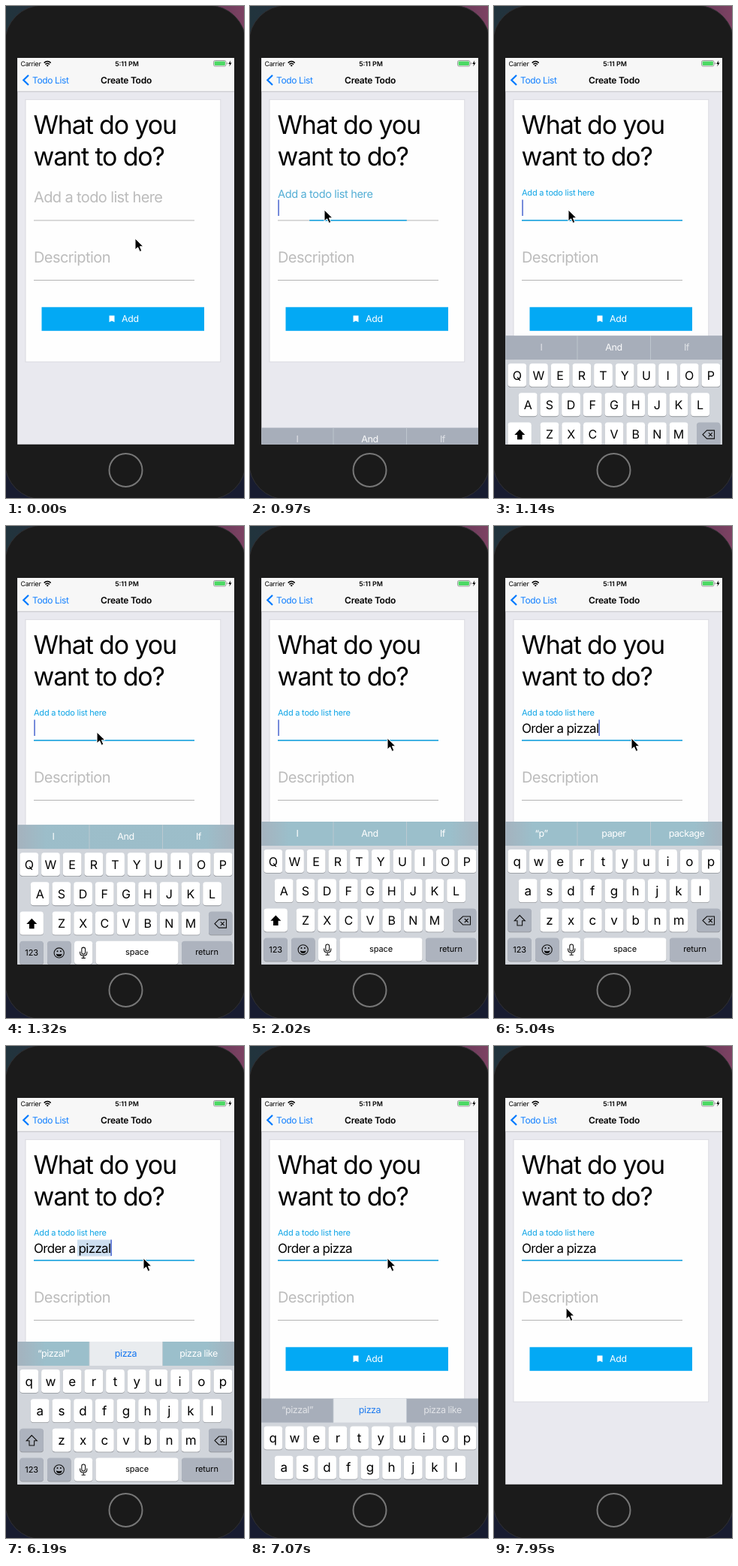
An HTML page that plays this animation: 317 px wide and 654 px high, repeating every 8 s.

```html
<!DOCTYPE html>
<html lang="en">
<head>
<meta charset="utf-8">
<title>Create Todo</title>
<style>
  html, body { margin: 0; width: 100%; height: 100%; overflow: hidden; background: #1b1b1b; }
  svg { display: block; width: 100%; height: 100%; }
  text { font-family: Inter, "Open Sans", sans-serif; font-optical-sizing: none; white-space: pre; text-rendering: geometricPrecision; }
  .mid { text-anchor: middle; }
  .title { font-size: 34px; letter-spacing: -.034em; }
  .nav { font-size: 12px; letter-spacing: -.03em; }
  .status { font-size: 8.8px; letter-spacing: -.03em; }
  .hint { font-size: 20px; letter-spacing: -.028em; fill: #bcbcbc; }
  .entry { font-size: 17px; letter-spacing: -.04em; }
  .small { font-size: 11px; letter-spacing: -.01em; }
  .guess { font-size: 12.5px; letter-spacing: -.035em; fill: #fff; }
</style>
</head>
<body>
<svg viewBox="0 0 317 654" preserveAspectRatio="none">
  <defs>
    <linearGradient id="desk">
      <stop offset="0" stop-color="#21343d"/><stop offset=".6" stop-color="#332a40"/><stop offset="1" stop-color="#7d4263"/>
    </linearGradient>
    <linearGradient id="tint">
      <stop offset="0" stop-color="#9dbfca" stop-opacity=".25"/><stop offset=".13" stop-color="#9bbfcb"/>
      <stop offset=".87" stop-color="#9bbfcb"/><stop offset="1" stop-color="#9dbfca" stop-opacity=".25"/>
    </linearGradient>
    <clipPath id="screen"><rect x="15.2" y="69" width="288.8" height="513.8"/></clipPath>
  </defs>

  <rect width="317" height="327" fill="url(#desk)"/>
  <rect y="327" width="317" height="327" fill="#181c30"/>
  <rect x="-1.5" y="-1" width="321" height="657" rx="50" fill="#1b1b1b" stroke="#303033"/>
  <circle cx="159.5" cy="617" r="22" fill="#1a1a1a" stroke="#777" stroke-width="2"/>

  <g clip-path="url(#screen)">
    <rect x="15" y="69" width="290" height="515" fill="#e9e9ef"/>
    <rect x="15" y="69" width="290" height="44.5" fill="#f7f7f7"/>
    <path d="M15 113.8H305" stroke="#b9b9be" stroke-width=".8"/>

    <text class="status" x="19.5" y="80">Carrier</text>
    <g fill="none" stroke="#000" stroke-width="1.5">
      <path d="M50.7 75.6Q55.2 71.3 59.7 75.6M52.4 77.6Q55.2 75 58 77.6"/>
    </g>
    <path d="M53.6 78.9Q55.2 77.6 56.8 78.9L55.2 80.6Z"/>
    <text class="status mid" x="161" y="80" font-weight="600" style="letter-spacing:0">5:11 PM</text>
    <rect x="276.5" y="72.5" width="16.5" height="7.6" rx="2" fill="none" stroke="#888" stroke-width=".8"/>
    <rect x="277.6" y="73.6" width="14.3" height="5.4" rx="1" fill="#4cd964"/>
    <path d="M294 75v2.6q1.2-.3 1.2-1.3t-1.2-1.3" fill="#888"/>
    <path d="M299.2 72.2L296.2 77H298.2L297.2 80.6L300.6 75.6H298.5Z"/>

    <path d="M30 92L23.3 98.5L30 105" fill="none" stroke="#007aff" stroke-width="2.2"/>
    <text class="nav" x="35" y="103" fill="#1480ff">Todo List</text>
    <text class="nav mid" x="160" y="103" font-weight="600" style="letter-spacing:-.022em">Create Todo</text>

    <rect x="26" y="124.3" width="259.8" height="348.7" fill="#fefefe" stroke="#d8d8de" stroke-width=".9"/>
    <text class="title" x="36.5" y="169.8">What do you</text>
    <text class="title" x="36.5" y="211.8">want to do?</text>

    <rect id="mark" y="257.5" height="22" fill="#cddff0"/>
    <text id="label" x="37"></text>
    <text id="entry" class="entry" x="37" y="274.6"></text>
    <rect id="caret" y="257.5" width="1.5" height="21.5" fill="#4a66cf"/>
    <path d="M37 285H251" stroke="#b4b4b4"/>
    <path id="line" stroke="#0fa5e6" stroke-width="1.5"/>

    <text class="hint" x="37" y="341">Description</text>
    <path d="M37 364.5H251" stroke="#b4b4b4"/>

    <rect x="47.5" y="400.3" width="216.5" height="31.5" fill="#03a9f4"/>
    <path d="M137.5 411.5h7v8.8l-3.5-1.7l-3.5 1.7Z" fill="#fff"/>
    <text x="154" y="420.3" font-size="12.3" letter-spacing="-.3" fill="#fff">Add</text>

    <g id="board"></g>
  </g>

  <path id="mouse" d="M0 0V15L3.6 11.8L6.2 17.5L8.8 16.4L6.4 10.8H11Z" fill="#000" stroke="#fff" stroke-width="1" stroke-linejoin="round"/>
</svg>

<script>
const LOOP = 8000, TICK = 88.3;
const FOCUS = 950, FIX = 6970;
const BLUE = [15, 165, 230], GREY = [188, 188, 188];
const $ = id => document.getElementById(id);
const clamp = v => Math.max(0, Math.min(1, v));
const ramp = (t, a, b) => clamp((t - a) / (b - a));
const mix = (a, b, p) => a + (b - a) * p;
const easeOut = p => 1 - (1 - p) ** 3;
const latest = (list, t) => list.filter(e => e[0] <= t).pop();

const typed = [
  [0, ''], [2190, 'O'], [2370, 'Or'], [2720, 'Ord'], [2980, 'Orde'], [3330, 'Order'],
  [3510, 'Order '], [3770, 'Order a'], [4040, 'Order a '], [4220, 'Order a p'], [4390, 'Order a pi'],
  [4570, 'Order a piz'], [4750, 'Order a pizz'], [4920, 'Order a pizza'], [5010, 'Order a pizzal'],
  [FIX, 'Order a pizza']
];
// Braces mark letters that are still fading in.
const guesses = [
  [0, 'I', 'And', 'If'], [2540, '“O”', 'Or', 'Of'], [2980, '“Or”', 'Order', 'Original'],
  [3330, '“Or{d}”', 'Ordered', 'Or{ig}ina'], [3420, '“Order”', 'Ordered', 'Orders'],
  [3680, 'the', 'of', 'for'], [4040, '“a”', 'and', 'at'], [4300, '“p”', 'paper', 'package'],
  [5360, '“pizzal”', 'pizza', 'pizza like']
];
const mousePath = [
  [0, 172, 309], [88, 204, 250], [177, 150, 147], [265, 60, 210], [353, 110, 335], [442, 150, 398],
  [530, 104, 276], [700, 99, 271], [1230, 99, 271], [1590, 183, 282], [7240, 183, 282],
  [7500, 150, 315], [7770, 101, 352], [7860, 98, 350], [7950, 96, 348]
];

function key(x, y, w, inner, dark) {
  const box = (dy, fill) => `<rect x="${x}" y="${y + dy}" width="${w}" height="31" rx="3.8" fill="${fill}"/>`;
  return box(.8, '#8f9298') + box(0, dark ? '#adb3be' : '#fff') + inner;
}
const word = (x, y, s) => `<text class="small mid" x="${x}" y="${y}">${s}</text>`;
const arrow = 'M34.3 517.5L27.3 524.8H31V531H37.6V524.8H41.3Z';

function buildBoard() {
  let out = '<rect x="15" y="393" width="290" height="32.5" fill="#a7aeba"/>' +
    '<rect id="glow" x="15" y="393" width="290" height="32.5" fill="url(#tint)"/>' +
    '<rect id="pick" x="111" y="393" width="97.5" height="32.5" fill="#e9ecef"/>' +
    '<path d="M111 393V425M208.5 393V425" stroke="#c3ccd4" stroke-width=".8"/>' +
    '<rect x="15" y="425" width="290" height="160" fill="#d1d5db"/><g id="words">';
  [63, 159.5, 256.5].forEach(x => out += `<text class="guess mid" x="${x}" y="412.5"></text>`);
  out += '</g>';
  [['QWERTYUIOP', 18.4, 430], ['ASDFGHJKL', 32.8, 469.2], ['ZXCVBNM', 61.6, 508.4]].forEach(([row, x0, y]) => {
    [...row].forEach((c, i) => {
      const x = x0 + i * 28.68;
      out += key(x, y, 24.8, `<text class="letter mid" x="${x + 12.4}" y="${y + 21.5}" data-c="${c}"></text>`);
    });
  });
  const line = 'fill="none" stroke="#111" stroke-width="1.1"';
  out += `<g id="shiftOn">${key(18.4, 508.4, 31.5, `<path d="${arrow}"/>`)}</g>`;
  out += `<g id="shiftOff">${key(18.4, 508.4, 31.5, `<path d="${arrow}" ${line}/>`, true)}</g>`;
  out += key(270, 508.4, 31.3, `<path d="M278 524.5L283.5 519H293.5V530H283.5ZM285.8 522L290.8 527M290.8 522L285.8 527" ${line}/>`, true);
  out += key(18.4, 547.5, 31.5, word(34.2, 567, '123'), true);
  out += key(55, 547.5, 31.5, `<circle cx="70.7" cy="563.3" r="6.6" ${line}/>` +
    '<path d="M66.8 564.5Q70.7 565.8 74.6 564.5Q74 568 70.7 568T66.8 564.5Z"/>' +
    '<circle cx="68.5" cy="561" r="1"/><circle cx="72.9" cy="561" r="1"/>', true);
  out += key(91, 547.5, 24.3, `<rect x="100.8" y="556" width="4.8" height="9" rx="2.4" ${line}/>` +
    `<path d="M98.6 561.5V563Q98.6 567 103.2 567T107.8 563V561.5M103.2 567V570M100.6 570.2H105.8" ${line}/>`);
  out += key(119.5, 547.5, 110, word(174.5, 566.3, 'space'));
  out += key(234, 547.5, 67.3, word(267.5, 566.3, 'return'), true);
  $('board').innerHTML = out;
}

function mouseAt(t) {
  const i = mousePath.findIndex(p => p[0] > t);
  if (i < 0) return mousePath[mousePath.length - 1].slice(1);
  const a = mousePath[i - 1], b = mousePath[i], p = ramp(t, a[0], b[0]);
  return [mix(a[1], b[1], p), mix(a[2], b[2], p)];
}

function widthOf(s) {
  entry.textContent = s;
  return s ? entry.getComputedTextLength() : 0;
}

function drawField(t) {
  const p = easeOut(ramp(t, FOCUS - 40, FOCUS + 190));
  const size = mix(20, 11, p);
  const rgb = GREY.map((g, i) => Math.round(mix(g, BLUE[i], p)));
  label.setAttribute('y', mix(261, 251.5, p));
  label.setAttribute('fill', `rgb(${rgb})`);
  label.style.fontSize = size + 'px';
  label.style.letterSpacing = size * mix(-.031, -.02, p) + 'px';
  $('line').setAttribute('d', `M${144 - 107 * p} 285H${144 + 107 * p}`);
  $('line').style.opacity = p > 0 ? 1 : 0;

  const [at, text] = latest(typed, t);
  const marked = t >= 5540 && t < FIX;
  const start = 37 + widthOf('Order a ');
  const end = 37 + widthOf(text);
  $('mark').setAttribute('x', start - 1.5);
  $('mark').setAttribute('width', marked ? end - start + 2.5 : 0);

  const phase = (t - Math.max(at, FOCUS + 20)) % 1060;
  const blink = 1 - ramp(phase, 530, 630) + ramp(phase, 1000, 1060) * .8;
  $('caret').setAttribute('x', Math.max(37.3, end));
  $('caret').style.opacity = t < FOCUS || t >= FIX ? 0 : blink;
}

function drawBoard(t) {
  const up = easeOut(ramp(t, FOCUS, FOCUS + 520));
  const down = ramp(t, FIX, FIX + 420);
  const drop = 190 * (1 - up + 1 - (1 - down) ** 2);
  $('board').setAttribute('transform', `translate(0 ${drop})`);
  $('board').style.display = drop > 189.5 ? 'none' : '';
  const near = clamp(1 - drop / 45);
  $('glow').style.opacity = near;

  const caps = t < typed[1][0];
  $('shiftOn').style.display = caps ? '' : 'none';
  $('shiftOff').style.display = caps ? 'none' : '';
  letters.forEach(el => {
    el.textContent = caps ? el.dataset.c : el.dataset.c.toLowerCase();
    el.style.fontSize = caps ? '16px' : '17px';
  });

  const picked = t >= 5540;
  const set = latest(guesses, t);
  $('pick').style.opacity = picked ? 1 : 0;
  words.forEach((el, i) => {
    el.innerHTML = set[i + 1].replace(/\{(.+?)\}/g, '<tspan fill-opacity=".5">$1</tspan>');
    el.style.fill = picked && i === 1 ? '#1677f0' : '#fff';
    el.style.opacity = mix(i === 1 ? .95 : .65, 1, near);
  });
}

function draw(t) {
  drawField(t);
  drawBoard(t);
  $('mouse').setAttribute('transform', `translate(${mouseAt(t)})`);
}

buildBoard();
const label = $('label'), entry = $('entry');
const letters = [...document.querySelectorAll('.letter')];
const words = [...$('words').children];
label.textContent = 'Add a todo list here';

const begin = performance.now();
function frame() {
  const t = (performance.now() - begin) % LOOP;
  draw(Math.floor((t + 13) / TICK) * TICK);
  requestAnimationFrame(frame);
}
frame();
</script>
</body>
</html>
```
